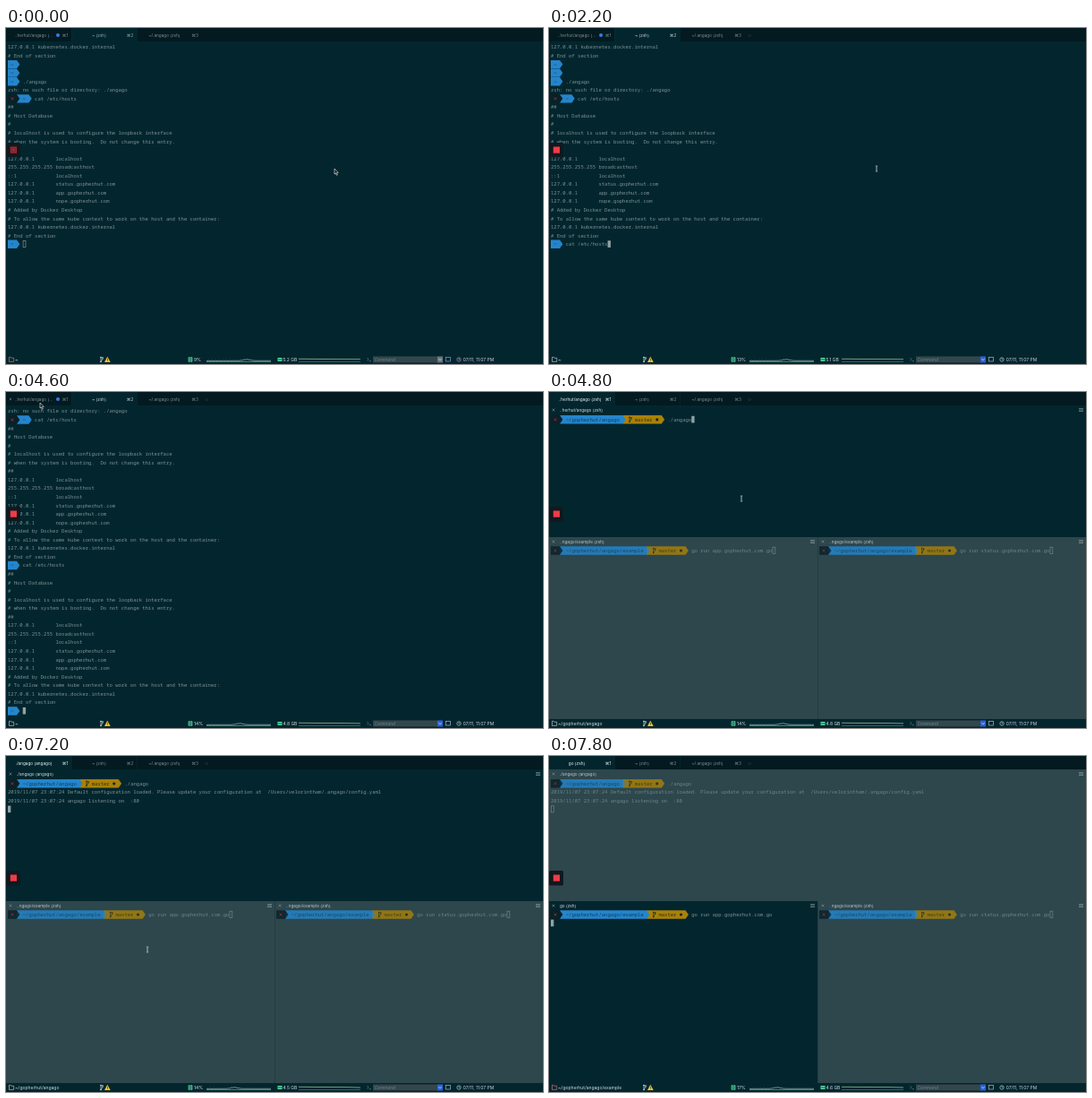
An HTML page with a canvas for the animation above (8000 ms loop, 600 px wide and 375 px high).

```html
<!DOCTYPE html>
<html>
<head>
<meta charset="utf-8">
<title>Terminal session</title>
<style>
html, body { margin: 0; width: 100%; height: 100%; overflow: hidden; background: #03262e; }
canvas { display: block; width: 600px; height: 375px; }
</style>
</head>
<body>
<canvas></canvas>
<script>
const LOOP = 8000, STEP = 200;
const CELL = 3.345, ROW = 9.557;
const MONO = '5.575px "Noto Sans Mono", monospace';
const BG = '#03262e', DARK = '#021a20', IDLE = '#2d474d', TEXT = '#7f9194', LIGHT = '#d3dcdd';
const BLUE = '#2585cc', YELLOW = '#a98109', RED = '#f03b48', GREEN = '#55dca0';

const canvas = document.querySelector('canvas');
const ctx = canvas.getContext('2d');
const ratio = window.devicePixelRatio || 1;
canvas.width = 600 * ratio;
canvas.height = 375 * ratio;

const hosts = `##
# Host Database
#
# localhost is used to configure the loopback interface
# when the system is booting.  Do not change this entry.
##
127.0.0.1       localhost
255.255.255.255 broadcasthost
::1             localhost
127.0.0.1       status.gopherhut.com
127.0.0.1       app.gopherhut.com
127.0.0.1       nope.gopherhut.com
# Added by Docker Desktop
# To allow the same kube context to work on the host and the container:
127.0.0.1 kubernetes.docker.internal
# End of section`.split('\n');

const home = (command = '', failed = false) => ({ path: '~', command, failed });
const history = [
  ...hosts.slice(-2), home(), home(), home('./angago'),
  'zsh: no such file or directory: ./angago',
  home('cat /etc/hosts', true), ...hosts
];

// Time, x, y, shape
const pointerKeys = [
  [0, 367, 160, 'arrow'], [200, 367, 160, 'beam'], [1400, 366, 157, 'beam'],
  [2400, 366, 157, 'beam'], [3200, 59, 299, 'beam'], [3600, 59, 299, 'beam'],
  [4400, 40, 22, 'arrow'], [4600, 38, 15, 'arrow'], [4800, 215, 119, 'beam'],
  [6200, 215, 119, 'beam'], [7200, 158, 216, 'beam'], [7400, 158, 216, 'beam']
];

// Time, processor load, memory
const loads = [
  [0, '9%', '5.2 GB'], [1000, '13%', '5.1 GB'], [2800, '11%', '5.1 GB'],
  [4200, '14%', '4.8 GB'], [6200, '14%', '4.5 GB'], [7400, '17%', '4.6 GB']
];

function rect(x, y, w, h, color) {
  ctx.fillStyle = color;
  ctx.fillRect(x, y, w, h);
}

function frame(x, y, w, h, color) {
  ctx.strokeStyle = color;
  ctx.lineWidth = 0.7;
  ctx.strokeRect(x, y, w, h);
}

function line(points, color, width = 0.6) {
  ctx.beginPath();
  points.forEach(([x, y]) => ctx.lineTo(x, y));
  ctx.strokeStyle = color;
  ctx.lineWidth = width;
  ctx.stroke();
}

function shape(points, color) {
  ctx.beginPath();
  points.forEach(([x, y]) => ctx.lineTo(x, y));
  ctx.closePath();
  ctx.fillStyle = color;
  ctx.fill();
}

function dot(x, y, r, color) {
  ctx.beginPath();
  ctx.arc(x, y, r, 0, 7);
  ctx.fillStyle = color;
  ctx.fill();
}

function mono(text, x, y, color = TEXT) {
  ctx.font = MONO;
  ctx.textAlign = 'left';
  ctx.fillStyle = color;
  ctx.fillText(text, x, y + 1.9);
}

function label(text, x, y, color = LIGHT, size = 4.7, align = 'left', style = '') {
  ctx.font = `${style} ${size}px Inter, sans-serif`;
  ctx.textAlign = align;
  ctx.fillStyle = color;
  ctx.fillText(text, x, y + 1.7);
}

function cross(x, y, color, r = 1.5) {
  line([[x - r, y - r], [x + r, y + r]], color);
  line([[x - r, y + r], [x + r, y - r]], color);
}

function textCursor(x, y, focused) {
  if (focused) rect(x, y - 4, CELL, 7.6, '#91a2a4');
  else frame(x + 0.4, y - 3.8, CELL - 0.5, 7.2, TEXT);
}

function segment(x, y, cells, color) {
  const end = x + cells * CELL, top = y - 4.7, bottom = y + 4.7;
  shape([[x, top], [end, top], [end + CELL, y], [end, bottom], [x, bottom]], color);
}

function branchIcon(x, y, color) {
  line([[x, y - 3], [x, y + 3]], color, 0.7);
  line([[x, y + 1.5], [x + 2, y], [x + 2, y - 2]], color, 0.7);
  dot(x, y - 2.5, 0.8, color);
  dot(x, y + 2.5, 0.8, color);
  dot(x + 2, y - 2, 0.8, color);
}

// Draws a prompt with its command and returns the x after the last character.
function prompt(x, y, { path, command, failed, branch }) {
  const at = n => x + n * CELL;
  let n = failed ? 4 : 0;
  const pathEnd = n + path.length + 2;
  if (branch) segment(at(pathEnd), y, 13, YELLOW);
  segment(at(failed ? 3 : 0), y, pathEnd - (failed ? 3 : 0), BLUE);
  if (failed) {
    segment(x, y, 3, '#0b2027');
    cross(at(1.5), y, '#d9353c', 1.4);
  }
  mono(path, at(n + 1), y, '#0a3f5c');
  n = pathEnd + 2;
  if (branch) {
    branchIcon(at(n + 0.3), y, '#14282b');
    mono('master', at(n + 2), y, '#2d3318');
    dot(at(n + 9.5), y, 1.6, '#14282b');
    n += 13;
  }
  mono(command, at(n), y);
  return at(n + command.length);
}

function tabs(t) {
  const first = t >= 4800, awake = t >= 200;
  const bright = awake ? '#c7d1d2' : '#9aa8aa', dim = '#7d8c8f';
  rect(0, 0, 600, 15, DARK);
  rect(first ? 0 : 73, 0, 73, 15, BG);
  [73, 146].forEach(x => rect(x, 0, 0.5, 15, '#0a3038'));
  let title = '..herhut/angago (...', center = 31;
  if (first) {
    title = '..herhut/angago (zsh)';
    center = 34.5;
    if (t >= 7400) title = '..ngago/example (zsh)';
    if (t >= 5400 && t < 7400) { title = './angago (angago)'; center = 31; }
    if (t >= 7600) { title = 'go (zsh)'; center = 31; }
  }
  label(title, center, 8, first ? '#edf2f2' : dim, 4.7, 'center');
  if (!first) dot(58, 8, 2, '#397ce8');
  if (t >= 4400 && t < 4800) cross(5, 8, dim, 1.2);
  label('⌘1', 66, 8, first ? '#edf2f2' : dim, 4.7, 'center');
  label('~ (zsh)', 104, 8, first ? dim : bright, 4.7, 'center');
  label('⌘2', 138.5, 8, first ? dim : bright, 4.7, 'center');
  label('~/.angago (zsh)', 177, 8, dim, 4.7, 'center');
  label('⌘3', 211, 8, dim, 4.7, 'center');
  if (awake) label('○', 224, 8, '#375056', 4, 'center');
}

function shell(t) {
  const ran = t >= 2400;
  const typed = 'cat /etc/hosts'.slice(0, Math.max(0, Math.round((t - 1400) / 800 * 14)));
  const rows = ran
    ? [...history.slice(5), home('cat /etc/hosts'), ...hosts, home()]
    : [...history, home(typed)];
  if (t >= 3000 && t < 3600) {
    rect(0, 275, 595, 9.6, '#062e37');
    rect(0, 275, 595, 0.5, '#123d45');
    rect(0, 284.2, 595, 0.5, '#123d45');
  }
  rows.forEach((row, i) => {
    const y = 21.5 + i * ROW;
    if (typeof row === 'string') mono(row, 2, y);
    else {
      const end = prompt(2, y, row);
      if (i === rows.length - 1) textCursor(end, y, t >= 200);
    }
  });
}

function pane(x, y, w, h, focused, title) {
  rect(x, y, w, h, focused ? BG : IDLE);
  cross(x + 5, y + 5, '#849598', 1.4);
  label(title, x + 12, y + 5, focused ? LIGHT : '#bac5c6');
  for (let i = 0; i < 3; i++) rect(x + w - 8, y + 3.2 + i * 1.5, 5, 0.6, '#94a3a5');
  ctx.globalAlpha = focused ? 1 : 0.82;
}

function splitPanes(t) {
  const running = t >= 5400, switched = t >= 7400, started = t >= 7600;
  const angago = { path: '~/gopherhut/angago', command: './angago', failed: true, branch: true };
  const example = command => ({ path: '~/gopherhut/angago/example', command, failed: true, branch: true });

  pane(0, 15, 600, 147, !switched, running ? './angago (angago)' : '..herhut/angago (zsh)');
  let end = prompt(2, 30.8, angago);
  if (running) {
    mono('2019/11/07 23:07:24 Default configuration loaded. Please update your configuration at  /Users/velorintham/.angago/config.yaml', 2, 40.4);
    mono('2019/11/07 23:07:24 angago listening on  :80', 2, 49.9);
    textCursor(2, 59.5, !switched);
  } else textCursor(end, 30.8, true);
  ctx.globalAlpha = 1;

  pane(0, 162, 300, 203, switched, started ? 'go (zsh)' : '..ngago/example (zsh)');
  end = prompt(2, 177, example('go run app.gopherhut.com.go'));
  if (started) textCursor(2, 186.6, true);
  else textCursor(end, 177, switched);
  ctx.globalAlpha = 1;

  pane(301, 162, 299, 203, false, '..ngago/example (zsh)');
  textCursor(prompt(302, 177, example('go run status.gopherhut.com.go')), 177, false);
  ctx.globalAlpha = 1;
  rect(300, 162, 1, 203, '#243c42');
}

function chip(x, y) {
  frame(x - 2, y - 2, 4, 4, GREEN);
  rect(x - 1, y - 1, 2, 2, '#1f7a66');
  for (let i = -1; i < 2; i++) {
    rect(x + i * 1.4 - 0.2, y - 3, 0.5, 6, GREEN);
  }
}

function statusBar(t) {
  const y = 370;
  rect(0, 365, 600, 10, BG);
  const folder = t < 200 || t >= 7400 ? '#e98187' : LIGHT;
  line([[3.5, 372.4], [3.5, 367.4], [5.3, 367.4], [6, 368.3], [8.7, 368.3], [8.7, 372.4], [3.3, 372.4]], folder);
  const path = t < 4800 ? '~' : t < 7400 ? '~/gopherhut/angago' : '~/gopherhut/angago/example';
  label(path, 10.3, y, LIGHT, 5);
  branchIcon(106, y, LIGHT);
  shape([[113.3, 366.7], [116.7, 373], [110, 373]], '#f5c52c');
  rect(113, 368.7, 0.7, 2.2, '#30301c');
  rect(113, 371.5, 0.7, 0.7, '#30301c');

  const [, load, memory] = loads.filter(([start]) => start <= t).pop();
  chip(206, y);
  label(load, 210, y, LIGHT, 5);
  const tick = Math.floor(t / 1000);
  const graph = [];
  for (let x = 224; x <= 296; x += 2) {
    const s = x + tick * 2;
    const bump = 2.1 * Math.exp(-(((s - 269) / 5) ** 2));
    graph.push([x, 371.6 - (0.45 + bump * 0.55) * Math.abs(Math.sin(s * 2.37)) - bump * 0.3]);
  }
  line(graph, '#b8d9d1', 0.6);
  rect(224, 372.2, 72, 0.7, '#39c98c');

  rect(303.5, 368, 5, 4, GREEN);
  rect(304.7, 369, 0.7, 2, BG);
  rect(306.7, 369, 0.7, 2, BG);
  label(memory, 309.5, y, LIGHT, 5);
  const level = 369.4 + (5.2 - parseFloat(memory)) * 0.5;
  line([[327, 369.3], [350, 369.5], [380, 369.6], [396, level + 0.3]], '#a9cda0', 0.7);
  rect(327, 372.4, 69, 0.6, '#389f79');

  line([[403.5, 368], [405, 369.7], [403.5, 371.4]], '#7e8e91');
  rect(405.5, 371.5, 2.5, 0.6, '#7e8e91');
  rect(410, 366.5, 72, 7, '#34464c');
  label('Command', 411.5, y, '#71858a', 4.8, 'left', 'italic');
  rect(482, 366.5, 6, 7, t < 200 ? '#68777c' : '#2e63d8');
  line([[483.5, 369.3], [485, 370.8], [486.5, 369.3]], '#e3e9ef', 0.8);
  frame(491.3, 367.5, 5.2, 4.5, t < 200 ? '#8794c9' : '#9db5df');
  ctx.beginPath();
  ctx.arc(506, y, 2.2, 0, 7);
  ctx.strokeStyle = t < 200 ? '#c995d1' : LIGHT;
  ctx.lineWidth = 0.6;
  ctx.stroke();
  line([[506, 368.5], [506, 370], [507.2, 370]], LIGHT, 0.5);
  label('07/11, 11:07 PM', 510.7, y, '#d2cfe2', 4.9);
}

function recorder(t) {
  ctx.beginPath();
  ctx.roundRect(0, 128, 16, 16.5, 1.5);
  ctx.fillStyle = '#10191f';
  ctx.fill();
  rect(4.8, 132.5, 7.2, 7.2, t < 200 ? '#a52a36' : RED);
  if (t < 200) frame(6.5, 134.2, 3.8, 3.8, '#631f29');
}

function pointer(t) {
  if (t > 7400) return;
  const i = pointerKeys.findLastIndex(([start]) => start <= t);
  const from = pointerKeys[i], to = pointerKeys[i + 1] || from;
  const p = to === from ? 0 : (t - from[0]) / (to[0] - from[0]);
  const ease = p * p * (3 - 2 * p);
  const x = from[1] + (to[1] - from[1]) * ease;
  const y = from[2] + (to[2] - from[2]) * ease;
  if (from[3] === 'arrow') {
    const points = [[0, -3], [0, 3], [1.3, 1.9], [2.4, 4.3], [3.4, 3.8], [2.4, 1.6], [4.2, 1.4]]
      .map(([dx, dy]) => [x + dx, y + dy]);
    shape(points, '#10181b');
    line([...points, points[0]], '#eef3f3', 0.6);
  } else {
    line([[x, y - 2.8], [x, y + 2.8]], LIGHT, 0.8);
    line([[x - 1.2, y - 3], [x + 1.2, y - 3]], LIGHT);
    line([[x - 1.2, y + 3], [x + 1.2, y + 3]], LIGHT);
  }
}

function draw(now) {
  const t = Math.floor((now % LOOP) / STEP) * STEP;
  ctx.setTransform(ratio, 0, 0, ratio, 0, 0);
  rect(0, 0, 600, 375, BG);
  if (t < 4800) shell(t);
  else splitPanes(t);
  tabs(t);
  statusBar(t);
  recorder(t);
  pointer(t);
}

const begin = performance.now();
function loop() {
  draw(performance.now() - begin);
  requestAnimationFrame(loop);
}
loop();
</script>
</body>
</html>
```
